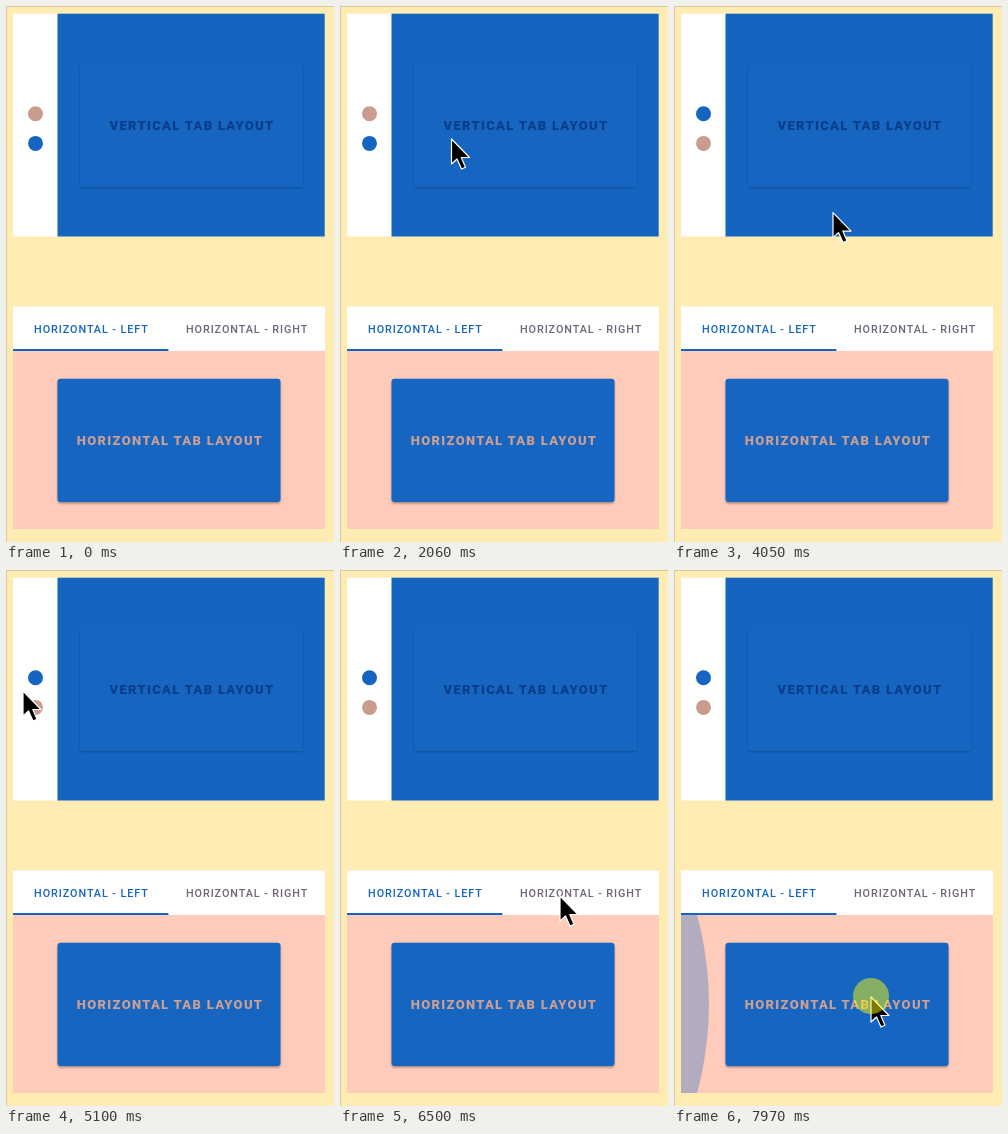
Recreate the animation shown at these times as an HTML page. Size 328x536 px, loop 8 s.

```html
<!DOCTYPE html>
<html lang="en">
<head>
<meta charset="utf-8">
<title>Tab layouts</title>
<style>
  html, body { margin: 0; width: 100%; height: 100%; overflow: hidden; background: #ffecb3; }
  svg { display: block; width: 328px; height: 536px; }
  text { font-family: Roboto, sans-serif; text-anchor: middle; }
  .title { font-weight: 900; font-size: 13px; letter-spacing: 1.3px; }
  .tab { font-weight: 500; font-size: 10.8px; letter-spacing: .94px; }
  .blue { fill: #1565c0; }
</style>
</head>
<body>
<svg viewBox="0 0 328 536">
  <defs>
    <filter id="shadow" x="-10%" y="-10%" width="120%" height="125%">
      <feDropShadow dx="0" dy="1.5" stdDeviation="1" flood-color="#000" flood-opacity=".35"/>
    </filter>
    <filter id="faint" x="-10%" y="-10%" width="120%" height="125%">
      <feDropShadow dx="0" dy=".8" stdDeviation=".8" flood-color="#003" flood-opacity=".3"/>
    </filter>
    <clipPath id="vClip"><rect x="52" y="8" width="267" height="223"/></clipPath>
    <clipPath id="hClip"><rect x="7" y="345" width="312" height="178"/></clipPath>
    <clipPath id="leftClip"><rect x="7" y="301" width="156" height="44"/></clipPath>
    <clipPath id="rightClip"><rect x="163" y="301" width="156" height="44"/></clipPath>
    <g id="vCard">
      <rect class="blue" x="74" y="58" width="223" height="123" rx="3" filter="url(#faint)"/>
      <text class="title" x="186.1" y="124.2" fill="#0a3d8a">VERTICAL TAB LAYOUT</text>
    </g>
    <g id="hCard">
      <rect class="blue" x="51.5" y="372.8" width="223" height="123.2" rx="3" filter="url(#shadow)"/>
      <text class="title" x="164.1" y="439.4" fill="#cb9f94">HORIZONTAL TAB LAYOUT</text>
    </g>
  </defs>

  <rect width="328" height="536" fill="#ffecb3"/>
  <path d="M0 .5H328M.5 0V536" stroke="#d9c89c" fill="none"/>

  <rect x="7" y="7.7" width="45" height="222.8" fill="#fff"/>
  <rect class="blue" x="51.5" y="7.7" width="267.2" height="222.8"/>
  <circle id="dot1" cx="29.5" cy="107.7" r="7.5"/>
  <circle id="dot2" cx="29.5" cy="137.4" r="7.5"/>
  <g clip-path="url(#vClip)">
    <g id="vPages"><use href="#vCard"/><use href="#vCard" y="223"/></g>
  </g>

  <rect x="7" y="345" width="312" height="178" fill="#ffccbc"/>
  <g clip-path="url(#hClip)">
    <circle id="reveal" class="blue" cy="434" r="336" fill-opacity=".32"/>
    <g id="hPages"><use href="#hCard"/><use href="#hCard" x="312.5"/></g>
  </g>
  <rect x="7" y="300.5" width="312" height="44.5" fill="#fff"/>
  <g clip-path="url(#leftClip)"><circle id="leftRipple" class="blue" cx="96.5" cy="324"/></g>
  <g clip-path="url(#rightClip)"><circle id="rightRipple" class="blue" cx="235" cy="324"/></g>
  <text id="leftTab" class="tab" x="85.4" y="327.2">HORIZONTAL - LEFT</text>
  <text id="rightTab" class="tab" x="241.1" y="327.2">HORIZONTAL - RIGHT</text>
  <rect id="bar" class="blue" x="7" y="343" width="155.4" height="2"/>

  <path id="cursor" d="M0 0V25L5.5 20L10 30L14 28.2L9.8 18.5H18Z" stroke="#fff" stroke-width="1.2" stroke-linejoin="round"/>
  <circle id="press" r="18" fill="#ff0" fill-opacity=".48"/>
</svg>
<script>
const LOOP = 8000, HOLD = 170, PRESS = 100, TRAVEL = 640;
const BLUE = '#1565c0', SALMON = '#c99c8d', GREY = '#6f6478';
const el = {};
document.querySelectorAll('svg [id]').forEach(n => el[n.id] = n);

const stop = (at, x, y, click = false) => ({ at, x, y, click });
const dotA = stop(980, 28, 139, true), dotB = stop(1520, 29, 108, true), dotC = stop(3130, 27, 139, true);
const toRight = stop(6500, 220, 326, true), toLeft = stop(6973, 117, 333, true);
const stops = [
  stop(0, 192, 540), dotA, dotB, stop(2060, 111.5, 133), dotC, stop(3760, 160, 182),
  stop(4300, 156, 280), stop(5100, 17, 121), stop(5850, 28, 50), toRight, toLeft,
  stop(7820, 197, 427, true)
];
const release = s => s.at + HOLD;

const part = (t, start, span) => Math.min(1, Math.max(0, (t - start) / span));
const settle = p => 1 - (1 - p) ** 5;
const smooth = p => p * p * (3 - 2 * p);
const set = (n, a, v) => n.setAttribute(a, v);
const move = (n, x, y) => set(n, 'transform', `translate(${x.toFixed(2)} ${y.toFixed(2)})`);

// cubic-bezier(.4, 0, .2, 1), solved by halving
function standard(p) {
  let lo = 0, hi = 1;
  for (let i = 0; i < 20; i++) {
    const u = (lo + hi) / 2, v = 1 - u;
    if (1.2 * v * v * u + .6 * v * u * u + u ** 3 < p) lo = u; else hi = u;
  }
  return 3 * (1 - lo) * lo * lo + lo ** 3;
}

// Each trip ends at its stop and begins no earlier than the previous release
function pointer(t) {
  let { x, y } = stops[0];
  stops.slice(1).forEach((s, i) => {
    const span = Math.min(TRAVEL, s.at - release(stops[i]));
    const p = smooth(part(t, s.at - span, span));
    x += (s.x - x) * p;
    y += (s.y - y) * p;
  });
  return [x, y];
}

function ripple(n, t, start) {
  set(n, 'r', 42 * Math.sqrt(part(t, start, 120)));
  set(n, 'fill-opacity', .09 * (1 - part(t, start + 120, 130)));
}

function draw(t) {
  const scroll = (s, span) => settle(part(t, release(s), span));
  const slide = s => standard(part(t, release(s) + 14, 300));
  const between = (a, b) => t >= release(a) && t < release(b);

  move(el.vPages, 0, -223 * (scroll(dotA, 420) - scroll(dotB, 420) + scroll(dotC, 420)));
  const second = between(dotA, dotB) || t >= release(dotC);
  set(el.dot1, 'fill', second ? BLUE : SALMON);
  set(el.dot2, 'fill', second ? SALMON : BLUE);

  move(el.hPages, -312.5 * (scroll(toRight, 600) - scroll(toLeft, 600)), 0);
  move(el.bar, 156 * (slide(toRight) - slide(toLeft)), 0);
  const right = between(toRight, toLeft);
  set(el.leftTab, 'fill', right ? GREY : BLUE);
  set(el.rightTab, 'fill', right ? BLUE : GREY);
  ripple(el.rightRipple, t, release(toRight) - 45);
  ripple(el.leftRipple, t, release(toLeft) - 45);
  set(el.reveal, 'cx', -331 + 30 * part(t, 7820, 150));

  const [x, y] = pointer(t);
  move(el.cursor, x, y);
  move(el.press, x, y - 1);
  const down = stops.some(s => s.click && t >= release(s) - PRESS && t < release(s));
  set(el.press, 'visibility', down ? 'visible' : 'hidden');
}

const begin = performance.now();
function tick() {
  draw((performance.now() - begin) % LOOP);
  requestAnimationFrame(tick);
}
tick();
</script>
</body>
</html>
```
